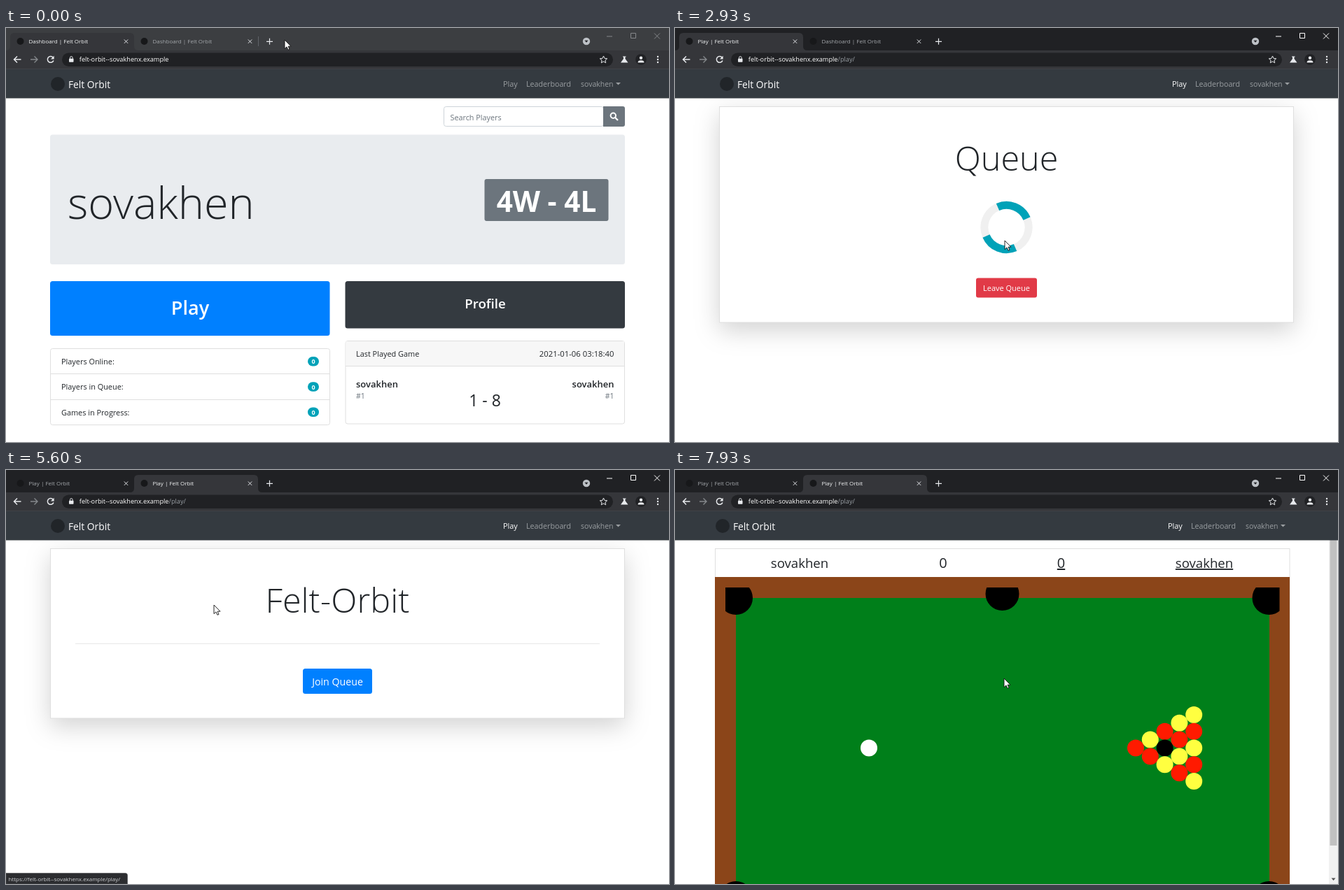
An HTML page for the animation above (8000 ms loop, 947 by 592 pixels).

```html
<!DOCTYPE html>
<html lang="en">
<head>
<meta charset="utf-8">
<title>Pool lobby</title>
<style>
html, body { margin: 0; width: 100%; height: 100%; overflow: hidden; background: #fff; }
svg { display: block; width: 947px; height: 592px; font-family: "Open Sans", "Noto Sans", sans-serif; }
text { white-space: pre; }
[hidden] { display: none; }
.shadow { filter: drop-shadow(0 11.8px 17.7px rgba(0, 0, 0, .175)); }
</style>
</head>
<body>
<svg id="stage" viewBox="0 0 947 592"></svg>
<script>
const LOOP = 8000;
const BRAND = 'Felt Orbit', USER = 'sovakhen', SITE = 'felt-orbit--sovakhenx.example';
const INK = '#212529', GREY = '#6c757d', BLUE = '#0080ff', BLUE_HOVER = '#006fdc', TEAL = '#00a2b8';
const MID = 'text-anchor="middle"', END = 'text-anchor="end"';
const LIGHT = 'font-weight="300"', SEMI = 'font-weight="600"';

const text = (x, y, str, size = 10.9, fill = INK, extra = '') =>
  `<text x="${x}" y="${y}" font-size="${size}" fill="${fill}" ${extra}>${str}</text>`;
const rect = (x, y, w, h, fill, extra = '') =>
  `<rect x="${x}" y="${y}" width="${w}" height="${h}" fill="${fill}" ${extra}/>`;
const circle = (x, y, r, fill, extra = '') => `<circle cx="${x}" cy="${y}" r="${r}" fill="${fill}" ${extra}/>`;
const line = (d, color, width = 1, extra = '') =>
  `<path d="${d}" fill="none" stroke="${color}" stroke-width="${width}" ${extra}/>`;
const shape = (d, fill, extra = '') => `<path d="${d}" fill="${fill}" ${extra}/>`;
const group = (id, content, extra = '') => `<g id="${id}" ${extra}>${content}</g>`;
const outlined = 'stroke="#dfdfdf"';

function dashboard() {
  const counters = ['Players Online:', 'Players in Queue:', 'Games in Progress:'].map((label, i) => {
    const y = 458.5 + 36.3 * i;
    return (i ? line(`M63 ${Math.floor(y) + .5}H462`, '#dfdfdf') : '') + text(79, y + 22.5, label) +
      rect(431, y + 11.5, 16, 13.5, TEAL, 'rx="6.75"') +
      text(439, y + 21.7, 0, 9, '#fff', MID + ' font-weight="700"');
  }).join('');
  return rect(625.5, 112.5, 228, 28, '#fff', 'rx="3" stroke="#ced4da"') +
    text(634.5, 132, 'Search Players', 10.8, GREY) +
    shape('M853 112h28q3 0 3 3v23q0 3-3 3h-28z', GREY) +
    circle(867.3, 125.3, 3.7, 'none', 'stroke="#fff" stroke-width="2"') + line('M870 128L874 132', '#fff', 2.3) +
    rect(63, 152.5, 821, 185.5, '#e9ecef', 'rx="3.5"') +
    text(88, 272.5, USER, 63, INK, LIGHT) +
    rect(683.5, 216, 177, 60, GREY, 'rx="3"') +
    text(772, 263, '4W - 4L', 40.6, '#fff', MID + ' font-weight="700"') +
    rect(63, 362, 399.5, 78, BLUE, 'rx="3.5" id="playButton"') +
    text(263, 409.5, 'Play', 27, '#fff', `${MID} ${SEMI}`) +
    rect(484.5, 362, 399.5, 67.5, '#343a40', 'rx="3.5"') +
    text(684.5, 400.5, 'Profile', 18.7, '#fff', `${MID} ${SEMI}`) +
    rect(63.5, 458.5, 399, 109, '#fff', 'rx="3" ' + outlined) + counters +
    rect(485, 447.5, 398.5, 118.5, '#fff', 'rx="3" ' + outlined) +
    rect(485.5, 448, 397.5, 35.5, '#f7f7f7') + line('M485 483.5H883', '#dfdfdf') +
    text(500, 470, 'Last Played Game') + text(868.5, 470, '2021-01-06 03:18:40', 11.3, INK, END) +
    text(500, 513.5, USER, 13, INK, SEMI) + text(868.5, 513.5, USER, 13, INK, `${END} ${SEMI}`) +
    text(500, 530, '#1', 10.5, GREY) + text(868.5, 530, '#1', 10.5, GREY, END) +
    text(684, 540.5, '1 - 8', 23, INK, MID + ' font-weight="500"');
}

const card = (height, title) =>
  rect(63.5, 112.5, 820, height, '#fff', outlined + ' class="shadow"') +
  text(473.5, 203.5, title, 48.5, INK, `${MID} ${LIGHT}`);

const lobby = () => card(242.5, BRAND.replace(' ', '-')) + line('M99 248.3H848', '#e6e6e6') +
  rect(424, 284, 99, 36, BLUE, 'rx="3.5" id="joinButton"') +
  text(473.5, 308, 'Join Queue', 14.2, '#fff', MID);

function queue() {
  const ring = (color, extra) => circle(0, 0, 31.6, 'none', `stroke="${color}" stroke-width="11" ${extra}`);
  return card(308.5, 'Queue') +
    group('spinner', ring('#f0f0f0', '') + ring(TEAL, 'pathLength="4" stroke-dasharray="1"')) +
    rect(430, 357.5, 87, 28, '#e13a47', 'rx="3"') + text(473.5, 376, 'Leave Queue', 11, '#fff', MID);
}

function game() {
  const pockets = [[87, 183], [467.5, 177], [848.5, 183], [87, 612], [848.5, 612]]
    .map(([x, y]) => circle(x, y, 24, '#000')).join('');
  const colors = { r: '#ff1a00', y: '#ffff40', k: '#000' };
  const rack = ['r', 'yr', 'rky', 'yryr', 'yryry'].map((column, i) => [...column].map((c, j) =>
    circle(658 + 20.8 * i, 397.5 + 23.8 * (j - i / 2), 12, colors[c])).join('')).join('');
  const label = (x, str, size, extra = '') => text(x, 140, str, size, INK, `${MID} font-weight="500" ${extra}`);
  const under = 'text-decoration="underline"';
  return rect(57.5, 112.5, 820.5, 480, '#fff', outlined) +
    label(178, USER, 18.6) + label(383, 0, 20) + label(551.5, 0, 20, under) + label(756, USER, 18.6, under) +
    rect(57, 153, 821, 440, '#8b4519') + rect(87, 183, 762, 410, '#007f1a') +
    `<clipPath id="bed">${rect(72, 168, 791.5, 430, '#000')}</clipPath>` +
    `<g clip-path="url(#bed)">${pockets}</g>` + circle(277, 397.5, 12, '#fff') + rack +
    rect(934, 59, 13, 533, '#f1f1f1') + rect(935.5, 72, 10, 465, '#c1c1c1') +
    shape('M937.5 68h6l-3-3.5z', '#a3a3a3') + shape('M937.5 583.5h6l-3 3.5z', '#505050');
}

const navbar = () => rect(-10, 59, 967, 41.5, '#343a40') +
  group('navItems', circle(74, 80, 10, INK) + text(89, 86, BRAND, 13.8, '#fff') +
    text(710, 84, 'Play', 10.9, '#999da0', 'id="navPlay"') + text(743, 84, 'Leaderboard', 10.7, '#999da0') +
    text(821, 84, USER, 10.5, '#999da0') + shape('M871 78h7l-3.5 3.6z', '#999da0'));

function browser() {
  const cross = (x, y, r, color) => line(`M${x - r} ${y - r}l${2 * r} ${2 * r}m0 ${-2 * r}l${-2 * r} ${2 * r}`, color);
  const tab = i => text(32.5 + 177 * i, 22.3, '', 8, '#dfe1e5', `id="title${i}"`) +
    circle(20.5 + 177 * i, 19, 5, '#17181a') + cross(171.5 + 177 * i, 19.2, 2.7, '#dfe1e5');
  const icon = '#e8eaed', dim = '#85888c';
  return rect(0, 0, 947, 32, '#202124', 'id="strip"') +
    shape('M0 32q6 0 6-6V13q0-6 6-6H177q6 0 6 6v13q0 6 6 6z', '#35363a', 'id="activeTab"') +
    tab(0) + tab(1) + line('M360.5 12V26', '#5f6368', 1, 'id="divider"') +
    line('M372 19.3h9m-4.5-4.5v9', icon, 1.2) +
    circle(829, 19, 5.2, '#bdc1c6') + shape('M826.5 17.8h5l-2.5 3z', '#202124') +
    group('controls', line('M858 12h8M892.5 7.5h7v7h-7zM926 7.5l8 8m0-8l-8 8', 'currentColor')) +
    rect(0, 32, 947, 27, '#35363a') + line('M0 58.5H947', '#45464a', .8) +
    rect(80, 35.5, 787, 19.5, '#202124', 'rx="9.75"') +
    line('M21.5 45H11.5m4.5-4.5L11.5 45l4.5 4.5', icon, 1.5) +
    line('M35 45h10m-4.5-4.5L45 45l-4.5 4.5', dim, 1.4) +
    line('M67.2 42.2A4.4 4.4 0 1 0 67.9 46.4', icon, 1.5) + shape('M68.6 39.8v4.6H64z', icon) +
    rect(90, 43.8, 6.5, 5, icon, 'rx=".7"') + line('M91.5 44v-1.5a1.8 1.8 0 0 1 3.6 0V44', icon) +
    text(104.8, 48.4, `${SITE}<tspan id="path" fill="#9aa0a6">/play/</tspan>`, 9.2, '#fff') +
    shape('M853.5 40l1.5 3.4 3.7.4-2.8 2.4.8 3.6-3.2-1.9-3.2 1.9.8-3.6-2.8-2.4 3.7-.4z', 'none', `stroke="${icon}"`) +
    shape('M881 40.5h4.500v1h-1v2.500l4 5.500h-10.500l4-5.500v-2.500h-1z', icon) +
    circle(907, 45, 7.8, '#202124') + circle(907, 42.8, 2.2, icon) + shape('M902.500 49.500q0-3.300 4.500-3.300t4.500 3.300z', icon) +
    [41, 45, 49].map(y => circle(931, y, 1.2, icon)).join('');
}

const status = (id, width, str, fill) => group(id,
  shape(`M0 576.5H${width - 3}q3 0 3 3V592H0z`, '#2c2d30', 'stroke="#505154" stroke-width=".6"') +
  text(3.5, 587.5, str, 8, fill));

const cursor = group('cursor',
  shape('M0 0V12.6L3 9.9L5 14.3L7 13.4L5.1 9.2H9Z', '#fff', 'stroke="#111" stroke-width=".9" id="arrow"') +
  shape('M-1.3 1.3a1.300 1.300 0 0 1 2.600 0V6l1-.5 1.300.7 1.300-.3 1 .8 1.200.1.800 1.200v4L6.500 17.500H.5L-4 11.500q-.8-1.800 1-1.800l1.700 1.500z',
    '#fff', 'stroke="#111" stroke-width=".9" id="hand"'));

const stage = document.getElementById('stage');
stage.innerHTML = group('dash', dashboard()) + group('lobby', lobby()) + group('queue', queue()) + group('game', game()) +
  navbar() + browser() + status('link', 173.5, `https://${SITE}/play/`, '#d0d2d5') +
  status('waiting', 314, `Waiting for ${SITE}...`, '#fff') + cursor;

const el = id => document.getElementById(id);
const show = (id, on) => el(id).toggleAttribute('hidden', !on);
const set = (id, name, value) => el(id).setAttribute(name, value);

// [time, page]
const pages = [[0, 'dash'], [1400, 'lobby'], [2740, 'queue'], [3930, 'dash'], [5400, 'lobby'], [7330, 'queue'], [7470, 'game']];
// [time, x, y] of the pointer
const route = [
  [0, 398, 17], [100, 398, 17], [930, 266, 398], [1270, 266, 398], [1600, 347, 307], [1800, 347, 307], [1870, 350, 305],
  [2600, 471, 304], [4180, 471, 304], [4460, 330, 118], [4800, 268, 400], [5130, 268, 400], [5600, 297, 193],
  [5950, 462, 227], [6330, 471, 304], [7800, 471, 304], [7930, 470, 298], [LOOP, 470, 298]
];

function pointer(t) {
  const i = route.findIndex(key => key[0] > t);
  const [t0, x0, y0] = route[i - 1], [t1, x1, y1] = route[i];
  const p = (t - t0) / (t1 - t0), ease = p * p * (3 - 2 * p);
  return [x0 + (x1 - x0) * ease, y0 + (y1 - y0) * ease];
}

function draw(now) {
  const t = now % LOOP;
  const [since, page] = pages.findLast(entry => entry[0] <= t);
  const [x, y] = pointer(t);
  const inside = (left, top, right, bottom) => x > left && x < right && y > top && y < bottom;
  const onPlay = page === 'dash' && inside(63, 362, 463, 440);
  const onJoin = page === 'lobby' && inside(424, 284, 523, 320);
  const focused = t >= 970, second = t >= 3930, inGame = page === 'game';

  for (const id of ['dash', 'lobby', 'queue', 'game']) show(id, id === page);
  set('playButton', 'fill', onPlay ? BLUE_HOVER : BLUE);
  set('joinButton', 'fill', onJoin ? BLUE_HOVER : BLUE);
  set('spinner', 'transform', `translate(473.5 285) rotate(${45 + 180 + (t - since) * .1133})`);

  set('navItems', 'transform', `translate(${inGame ? -6 : 0})`);
  set('navPlay', 'fill', page === 'dash' ? '#999da0' : '#fff');
  show('path', page !== 'dash');
  set('strip', 'fill', focused ? '#202124' : '#3c3e41');
  set('controls', 'color', focused ? '#fff' : '#85878a');
  show('divider', !focused);
  set('activeTab', 'transform', `translate(${second ? 177 : 0})`);
  [1400, 5400].forEach((loaded, i) => {
    el('title' + i).textContent = `${t < loaded ? 'Dashboard' : 'Play'} | ${BRAND}`;
    set('title' + i, 'fill', second === (i === 1) ? '#f1f3f4' : '#a3a7ab');
  });

  const waiting = t > 1300 && t < 1893;
  show('waiting', waiting);
  set('waiting', 'opacity', Math.min(1, (1893 - t) / 93));
  show('link', !waiting && (onPlay || t > 5130 && t < 5870));

  set('cursor', 'transform', `translate(${x} ${y})`);
  show('hand', onPlay || onJoin);
  show('arrow', !onPlay && !onJoin);
}

const start = performance.now();
function tick() {
  draw(performance.now() - start);
  requestAnimationFrame(tick);
}
tick();
</script>
</body>
</html>
```
